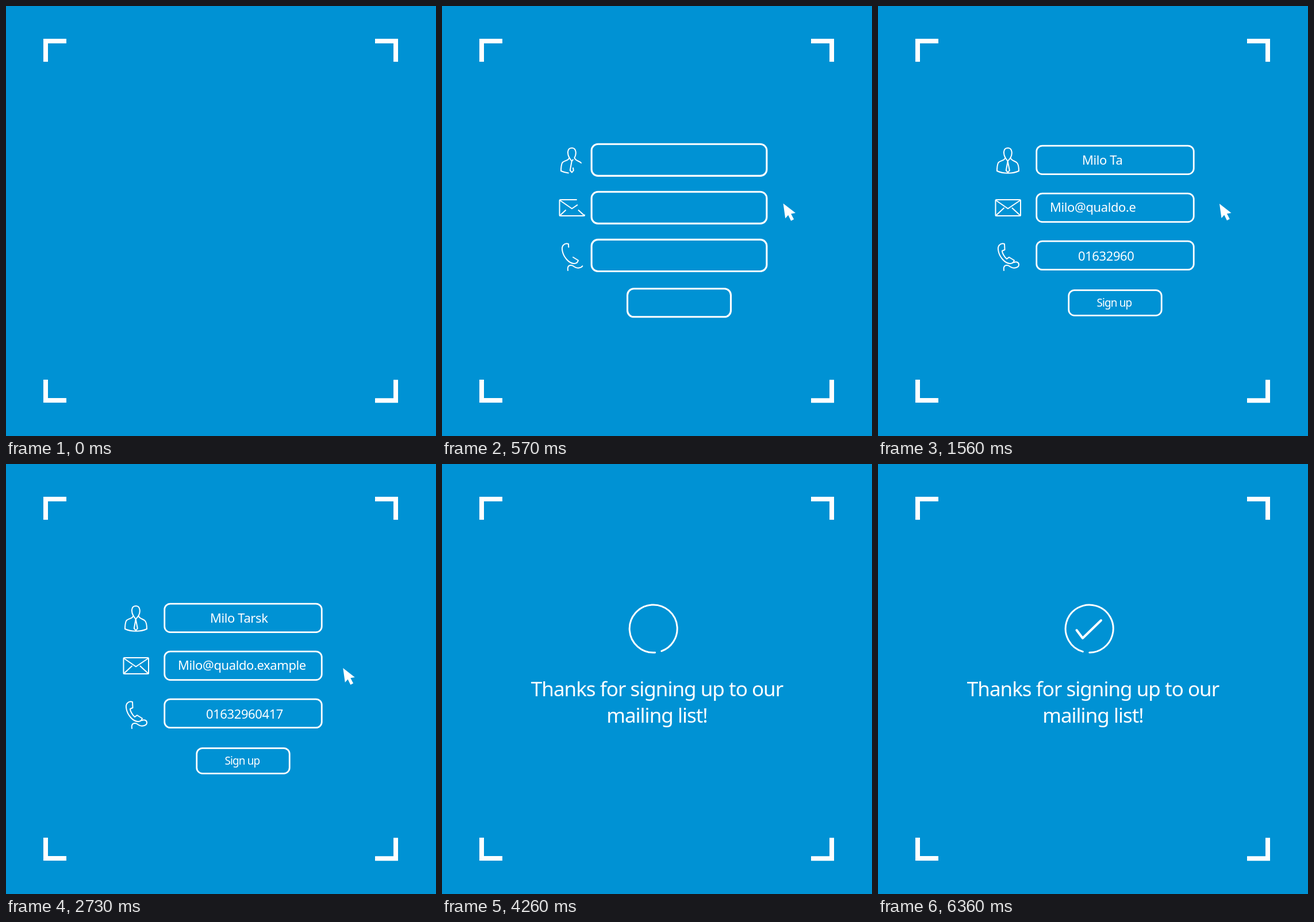
An HTML page for the animation above (6.39 s loop, 748 by 748 pixels).

```html
<!DOCTYPE html>
<html lang="en">
<head>
<meta charset="utf-8">
<title>Sign up form</title>
<style>
  html, body { margin: 0; width: 100%; height: 100%; overflow: hidden; background: #0092d4; }
  svg { display: block; width: 100vw; height: 100vh; }
  text { fill: #fff; stroke: none; font-family: "Noto Sans", "Open Sans", sans-serif; }
  .line { fill: none; stroke: #fff; stroke-linecap: round; stroke-linejoin: round; }
  .entry { font-size: 22px; letter-spacing: -.4px; white-space: pre; }
  .thanks { font-size: 35px; letter-spacing: -1px; text-anchor: middle; }
</style>
</head>
<body>
<svg viewBox="0 0 748 748">
  <rect width="748" height="748" fill="#0092d4"/>
  <path fill="none" stroke="#fff" stroke-width="8"
    d="M69 97V61H105 M642 61H678V97 M69 650V686H105 M642 686.3H678V650.3"/>

  <g id="form">
    <g class="line" stroke-width="2" id="icons">
      <!-- person -->
      <path d="M242 273C239 269 232 270 230.5 264C234 258 234 247 226 247C217 247 218 258 221.5 264C220 270 212 268 209 273C207 278 207 283 207 287C218 292 234 292 245 287C245 283 245 277 242 273"/>
      <path d="M221.5 264L225.7 270L230.5 264"/>
      <path d="M225.7 270L222.8 286L226 289.5L228.8 286Z"/>
      <!-- envelope -->
      <path d="M248 363.5Q248 365 246.500 365H206Q204.500 365 204.500 363.500V338.500Q204.500 337 206 337H246.500Q248 337 248 338.500Z"/>
      <path d="M205 338L226 352.500L247.500 338"/>
      <path d="M205 364.500L219 351.500"/>
      <path d="M247.500 364.500L233.500 351.500"/>
      <!-- phone -->
      <path d="M228 437L237 442.500C235 450 225 450 217 441C209 432 207 420 211 416Q215 412 220 414L220.500 424L216 426C216 430 221 438 224 440L228 437"/>
      <path d="M219 460C217 449 226 450 230 453.500C236 458 245 455 245 450C245 446 241 444 236.500 446"/>
    </g>
    <g class="line" stroke-width="2.800" id="boxes"></g>
    <text id="signup" x="380.500" y="523" font-size="19" letter-spacing="-.9">Sign up</text>
    <g id="entries"></g>
    <path id="cursor" fill="#fff" d="M0 0L20.500 16L13 17.300L17.800 26.500L13 29L8.300 19.500L3.500 25Z"/>
  </g>

  <g id="done">
    <circle id="ring" class="line" r="41.500" stroke-width="3" pathLength="360" stroke-dasharray="344 16"/>
    <path id="check" class="line" stroke-width="4" pathLength="1" d="M345.500 289L356 303L388 272"/>
    <text class="thanks" x="374" y="403.500">Thanks for signing up to our</text>
    <text class="thanks" x="374" y="450">mailing list!</text>
  </g>
</svg>
<script>
const LOOP = 6390, STEP = 30;
const $ = id => document.getElementById(id);

function add(parent, tag, attrs) {
  const el = document.createElementNS('http://www.w3.org/2000/svg', tag);
  for (const name in attrs) el.setAttribute(name, attrs[name]);
  return parent.appendChild(el);
}

const clamp = v => Math.min(1, Math.max(0, v));
const span = (t, from, to) => clamp((t - from) / (to - from));
const smooth = u => u * u * (3 - 2 * u);

// Eased value from [time, value] keys
function track(keys, t) {
  if (t <= keys[0][0]) return keys[0][1];
  for (let i = 1; i < keys.length; i++) {
    const [t0, v0] = keys[i - 1], [t1, v1] = keys[i];
    if (t <= t1) return v0 + (v1 - v0) * smooth((t - t0) / (t1 - t0));
  }
  return keys[keys.length - 1][1];
}

const boxes = [[267.8, 273.5, 49.5], [350.8, 273.5, 49.5], [433.9, 273.5, 49.5], [516.3, 161.5, 44]]
  .map(([y, w, h]) => ({
    y, el: add($('boxes'), 'rect', { x: -w / 2, y: -h / 2, width: w, height: h, rx: 10 })
  }));

const entries = [
  [355, 275.5, 'Milo Tarsk'],
  [299, 357.5, 'Milo@qualdo.example'],
  [348, 443, '01632960417']
].map(([x, y, text]) => ({ text, el: add($('entries'), 'text', { x, y, class: 'entry' }) }));

const strokes = [...$('icons').children];
strokes.forEach(path => path.setAttribute('pathLength', 1));

const boxScale = [[300, 0], [560, 1.115], [750, 1]];
const cursorScale = [[300, 0], [480, 1.15], [620, 1]];
const gapAngle = [[4260, 78], [4560, 128], [4860, 62], [5130, 102], [5550, 45], [5985, 150], [6390, 97]];

function trace(path, amount) {
  path.style.visibility = amount > 0 ? 'inherit' : 'hidden';
  path.style.strokeDasharray = amount < 1 ? `${amount} 2` : 'none';
}

function drawForm(t) {
  const traced = 1 - Math.pow(1 - span(t, 320, 1110), 3.3);
  strokes.forEach(path => trace(path, traced));

  const scale = track(boxScale, t);
  boxes.forEach(({ y, el }) => el.setAttribute('transform', `translate(412.5 ${y}) scale(${scale})`));
  $('signup').style.opacity = span(t, 600, 750);

  const typed = span(t, 1170, 1740);
  entries.forEach(({ text, el }) => {
    el.textContent = text.slice(0, Math.round(typed * text.length));
  });

  const move = span(t, 2700, 3210);
  const x = 594 - 131 * move, y = 344 + 185 * move;
  $('cursor').setAttribute('transform',
    `translate(${x + 10} ${y + 14}) scale(${track(cursorScale, t)}) translate(-10 -14)`);
}

function drawDone(t) {
  $('ring').setAttribute('transform', `translate(367.7 286.500) rotate(${track(gapAngle, t) + 8})`);
  trace($('check'), smooth(span(t, 4320, 4830)));
}

function render(time) {
  const t = Math.floor(time % LOOP / STEP) * STEP;
  const finished = t >= 4260;
  $('form').style.visibility = t >= 330 && !finished ? 'visible' : 'hidden';
  $('done').style.visibility = finished ? 'visible' : 'hidden';
  if (finished) drawDone(t);
  else drawForm(t);
}

const start = performance.now();
function tick() {
  render(performance.now() - start);
  requestAnimationFrame(tick);
}
tick();
</script>
</body>
</html>
```
